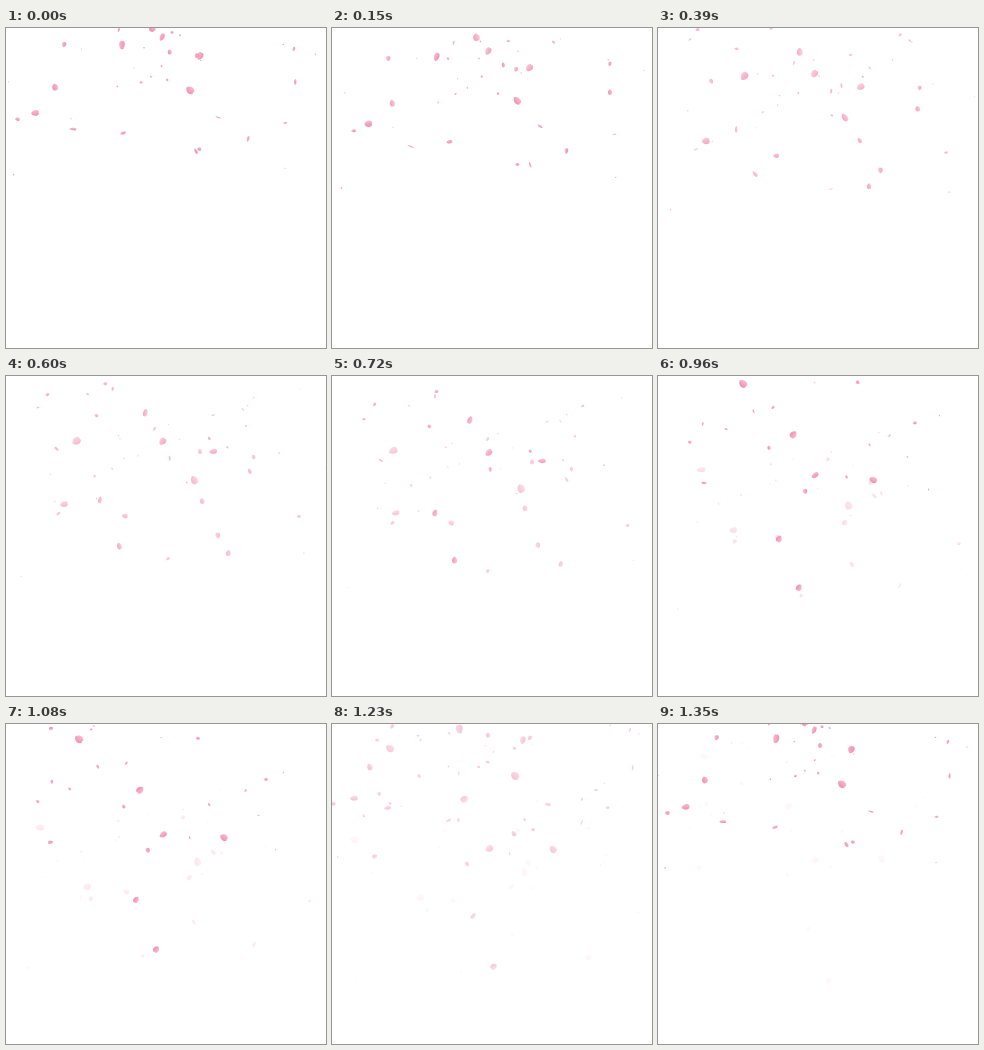
Animation, 320 px wide and 320 px high, one loop 1.38 s. Source, as an HTML page with a canvas:

```html
<!DOCTYPE html>
<html>
<head>
<meta charset="utf-8">
<title>Falling petals</title>
<style>
html, body { margin: 0; width: 100%; height: 100%; overflow: hidden; background: #fff; }
canvas { display: block; width: 320px; height: 320px; }
</style>
</head>
<body>
<canvas id="stage" width="320" height="320"></canvas>
<script>
const ctx = document.getElementById('stage').getContext('2d');
const STAGE = 320;
const LOOP = 1380;

const clamp = v => Math.max(0, Math.min(1, v));
const ramp = (t, from, to) => clamp((t - from) / (to - from));
const mix = (a, b, k) => a + (b - a) * k;

function seeded(seed) {
  return () => {
    seed = (seed * 16807) % 2147483647;
    return seed / 2147483647;
  };
}
const random = seeded(4127);
const between = (a, b) => mix(a, b, random());

// Early petals thin out through the loop; late ones pale midway, then fade at its end.
const early = t => 1 - ramp(t, 150, 1350);
const late = t => (1 - 0.3 * Math.sin(Math.PI * ramp(t, 0, 840))) * (1 - ramp(t, 1080, 1375));

function makePetal(life, x, y, vx, vy, size) {
  return {
    life, x, y, vx, vy, size,
    angle: between(0, Math.PI),
    spin: between(-2, 2),
    phase: between(0, Math.PI),
    flip: between(1.5, 4)
  };
}

// The most prominent petals.
const petals = [
  makePetal(early, 116, 17, -76, 80, 9),
  makePetal(early, 184, 62, 7, 70, 9),
  makePetal(early, 29, 85, 48, 72, 8),
  makePetal(early, 117, 105, 3, 58, 6),
  makePetal(early, 190, 123, 54, 90, 6),
  makePetal(late, 181, -52, -100, 62, 9),
  makePetal(late, 156, 9, 1, 94, 8),
  makePetal(late, 146, 0, -11, 61, 8),
  makePetal(late, 194, 28, 22, 79, 8),
  makePetal(late, 49, 59, 75, 108, 7),
  makePetal(late, 67, 101, 77, 115, 7)
];

// Small petals gather near the top and grow sparse further down.
for (let i = 0; i < 50; i++) {
  const life = i % 2 ? late : early;
  const y = life === early ? mix(0, 150, random() ** 1.5) : between(-90, 50);
  const size = mix(1.5, 6, random() ** 1.5);
  petals.push(makePetal(life, between(0, STAGE), y, between(-80, 80), between(55, 110), size));
}

function petalPath(width, half) {
  ctx.beginPath();
  ctx.moveTo(0, half);
  ctx.bezierCurveTo(width * 1.2, half * 0.6, width * 1.3, -half * 0.8, width * 0.25, -half);
  ctx.lineTo(0, -half * 0.85);
  ctx.lineTo(-width * 0.25, -half);
  ctx.bezierCurveTo(-width * 1.3, -half * 0.8, -width * 1.2, half * 0.6, 0, half);
}

function drawPetal(p, t) {
  const alpha = ramp(t, -290, -30) * p.life(t);
  if (alpha <= 0) return;
  const s = t / 1000;
  const half = p.size / 2;
  const turn = Math.abs(Math.cos(p.phase + p.flip * s));
  const minimum = p.size > 7 ? 0.55 : 0.22;
  const width = half * mix(minimum, 0.85, turn);

  ctx.save();
  ctx.globalAlpha = alpha;
  ctx.translate(p.x + p.vx * s, p.y + p.vy * s);
  ctx.rotate(p.angle + p.spin * s);
  const shade = ctx.createLinearGradient(-width, 0, width, 0);
  shade.addColorStop(0, '#fabbd0');
  shade.addColorStop(1, '#f08fb0');
  ctx.fillStyle = shade;
  petalPath(width, half);
  ctx.fill();
  ctx.restore();
}

function frame() {
  const t = performance.now() % LOOP;
  ctx.fillStyle = '#fff';
  ctx.fillRect(0, 0, STAGE, STAGE);
  for (const p of petals) {
    drawPetal(p, t);
    drawPetal(p, t - LOOP);
  }
  requestAnimationFrame(frame);
}
frame();
</script>
</body>
</html>
```
